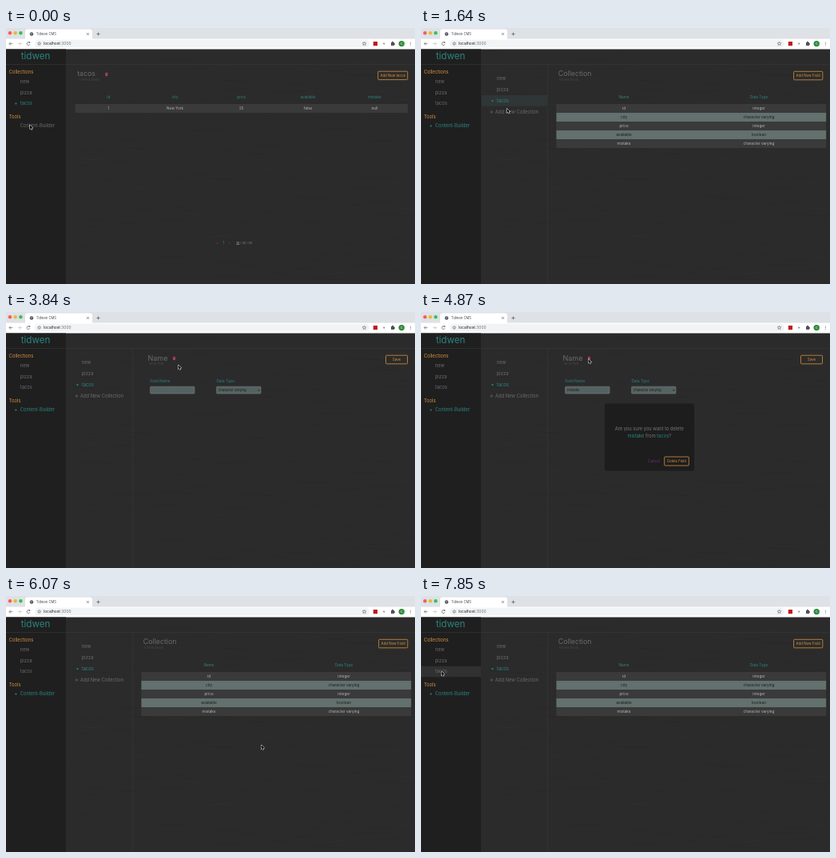
Animation, 512 px wide and 320 px high, one loop 8000 ms. Source, as an HTML page with a canvas:

```html
<!DOCTYPE html>
<html lang="en">
<head>
<meta charset="utf-8">
<title>Tidwen CMS</title>
<style>
html, body { margin: 0; width: 100%; height: 100%; overflow: hidden; background: #2b2b2b; }
canvas { display: block; width: 512px; height: 320px; }
</style>
</head>
<body>
<canvas id="stage"></canvas>
<script>
const W = 512, H = 320, LOOP = 8000, STEP = 148.15, LAST = 53;
const TEAL = '#2a8580', ORANGE = '#d5913f', GREY = '#6b6b6b', PALE = '#b5b5b5', DARK = '#1b1d1d';
const PURPLE = '#7d2480', PINK = '#b04358';

const canvas = document.getElementById('stage');
const ratio = window.devicePixelRatio || 1;
canvas.width = W * ratio;
canvas.height = H * ratio;
const ctx = canvas.getContext('2d');
ctx.scale(ratio, ratio);

// Cursor path: step, x, y
const path = [
  [1, 30, 121], [3, 31, 121], [8, 104, 92], [10, 105, 94], [11, 107.5, 100.5],
  [14, 190, 140], [16, 262, 153], [17, 268, 148], [18, 271, 145.5],
  [19, 278.5, 143], [22, 278.5, 143], [26, 215.7, 66], [28, 209.5, 58.5],
  [32, 209.5, 58.5], [37, 306, 181], [38, 320, 190], [39, 319.5, 186],
  [42, 319.5, 186], [45, 262, 158], [48, 133, 109.5], [50, 57, 104],
  [51, 45, 101], [52, 30, 97], [53, 25.5, 94]
];

function cursorAt(n) {
  const i = path.findIndex(p => p[0] >= n);
  if (i <= 0) return path[0].slice(1);
  const [a, ax, ay] = path[i - 1], [b, bx, by] = path[i];
  const k = (n - a) / (b - a);
  return [ax + (bx - ax) * k, ay + (by - ay) * k];
}

function box(x, y, w, h, fill) {
  ctx.fillStyle = fill;
  ctx.fillRect(x, y, w, h);
}

function round(x, y, w, h, r, fill, stroke, width = 0.8) {
  ctx.beginPath();
  ctx.roundRect(x, y, w, h, r);
  if (fill) { ctx.fillStyle = fill; ctx.fill(); }
  if (stroke) { ctx.strokeStyle = stroke; ctx.lineWidth = width; ctx.stroke(); }
}

function dot(x, y, r, fill) {
  ctx.fillStyle = fill;
  ctx.beginPath();
  ctx.arc(x, y, r, 0, Math.PI * 2);
  ctx.fill();
}

function line(points, color, width = 0.7) {
  ctx.strokeStyle = color;
  ctx.lineWidth = width;
  ctx.beginPath();
  points.forEach(([x, y], i) => i ? ctx.lineTo(x, y) : ctx.moveTo(x, y));
  ctx.stroke();
}

// y is the optical middle of the line; returns the text width
function text(str, x, y, size, color, align = 'left', family = 'Inter') {
  ctx.font = `${size}px ${family}, sans-serif`;
  ctx.textAlign = align;
  ctx.fillStyle = color;
  ctx.fillText(str, x, y + size * 0.34);
  return ctx.measureText(str).width;
}

function outlined(label, x, y, w, h, size = 4.4) {
  round(x, y, w, h, 1, null, ORANGE);
  text(label, x + w / 2, y + h / 2, size, ORANGE, 'center');
}

function trash(x, y) {
  box(x - 1.7, y - 1.9, 3.4, 0.8, PINK);
  box(x - 0.6, y - 2.3, 1.2, 0.5, PINK);
  box(x - 1.4, y - 0.9, 2.8, 3, PINK);
}

function browser() {
  box(0, 0, W, 14, '#dee1e6');
  round(24, 1.6, 84, 14, [3, 3, 0, 0], '#fff');
  box(0, 13.6, W, 12.9, '#fff');
  ['#fc5b57', '#e6b93a', '#35c24a'].forEach((c, i) => dot(5 + i * 6.7, 6.2, 2.2, c));
  dot(32, 7.5, 2.3, '#555b61');
  line([[30.5, 7], [32, 7.7], [33, 6.2]], '#c5c8cc', 0.6);
  text('Tidwen CMS', 37.8, 7.5, 4.2, '#45484c');
  line([[101.2, 6.2], [103.8, 8.8]], '#555');
  line([[103.8, 6.2], [101.2, 8.8]], '#555');
  line([[113.4, 7.5], [117.6, 7.5]], '#555');
  line([[115.5, 5.4], [115.5, 9.6]], '#555');

  line([[8.3, 19.6], [4, 19.6]], '#5f6368');
  line([[6, 17.6], [4, 19.6], [6, 21.6]], '#5f6368');
  line([[14.9, 19.6], [19.2, 19.6]], '#b8babd');
  line([[17.2, 17.6], [19.2, 19.6], [17.2, 21.6]], '#b8babd');
  ctx.beginPath();
  ctx.arc(28, 19.6, 2, 0.3, 5.5);
  ctx.strokeStyle = '#5f6368';
  ctx.stroke();
  box(28.6, 17.3, 1.7, 1.5, '#5f6368');

  round(36, 14.8, 419, 9.8, 4.9, '#f1f3f4');
  dot(41.6, 19.6, 2, '#696d72');
  dot(41.6, 19.6, 1.4, '#f1f3f4');
  box(41.3, 19.3, 0.6, 1.3, '#696d72');
  const w = text('localhost', 47, 19.6, 4.9, '#222');
  text(':3000', 47 + w, 19.6, 4.9, '#70757a');

  const star = Array.from({ length: 11 }, (_, i) => {
    const r = i % 2 ? 1.1 : 2.5, a = i * Math.PI / 5 - Math.PI / 2;
    return [448.5 + r * Math.cos(a), 19.6 + r * Math.sin(a)];
  });
  line(star, '#5f6368', 0.6);
  box(459.8, 17, 5.2, 5.2, '#c3151c');
  dot(473.2, 19.6, 1.1, '#8d9196');
  box(482, 18, 4, 4, '#4f5358');
  dot(484, 17.8, 1, '#4f5358');
  dot(486, 20, 1, '#4f5358');
  dot(495.2, 19.6, 3.7, '#2d8a3b');
  text('C', 495.2, 19.6, 4, '#fff', 'center');
  [-1.7, 0, 1.7].forEach(d => dot(506.3, 19.6 + d, 0.5, '#5f6368'));
}

// Faint grain on the page background
function grain() {
  let seed = 7;
  const rnd = () => (seed = seed * 16807 % 2147483647) / 2147483647;
  for (let i = 0; i < 260; i++) {
    const x = 75 + rnd() * 437, y = 28 + rnd() * 292, len = 8 + rnd() * 40;
    line([[x, y], [x + len / 2, y + rnd() - 0.5], [x + len, y + rnd() * 2 - 1]],
      i % 2 ? 'rgba(255,255,255,0.018)' : 'rgba(0,0,0,0.06)', 0.6);
  }
}

function item(label, x, y, active) {
  if (active) dot(x - 5.4, y, 1.1, TEAL);
  text(label, x, y, 5.8, active ? TEAL : GREY);
}

function sidebar(n, view) {
  box(0, 26.5, 75, H - 26.5, '#1f1f1f');
  line([[0, 45.5], [W, 45.5]], '#393939', 0.6);
  text('tidwen', 37, 35.5, 11.6, TEAL, 'center');
  if (n >= 2 && n < 5) box(0, 116, 75, 13, '#2c2c2c');
  if (n >= 52) box(0, 87.8, 75, 13.4, '#313131');
  text('Collections', 3.8, 55.3, 5.8, ORANGE);
  item('new', 17.8, 67, false);
  item('pizza', 17.8, 80.7, false);
  item('tacos', 17.8, 94.5, view === 'entries');
  text('Tools', 3.8, 111, 5.8, ORANGE);
  item('Content-Builder', 17.8, 122.5, view !== 'entries');
}

function builderList(n) {
  line([[158.5, 46], [158.5, H]], '#363636', 0.6);
  if (n >= 9 && n < 12) box(76, 84, 82, 13.6, '#303535');
  const chosen = n < 10 ? 'new' : 'tacos';
  ['new', 'pizza', 'tacos'].forEach((name, i) => item(name, 94.8, 63.5 + i * 13.8, name === chosen));
  line([[86.3, 105], [90.5, 105]], GREY, 0.6);
  line([[88.4, 102.9], [88.4, 107.1]], GREY, 0.6);
  text('Add New Collection', 93, 105, 5.8, GREY);
}

function entries() {
  text('tacos', 89.2, 57.5, 8.8, GREY);
  text('1 entries found', 91, 64.5, 3.7, '#494949');
  trash(125.8, 58);
  outlined('Add New tacos', 465.7, 54.2, 37, 10.4);
  box(86.7, 95, 416.3, 11, '#3a3a3a');
  const cells = { id: '1', city: 'New York', price: '25', available: 'false', mistake: 'null' };
  Object.entries(cells).forEach(([head, value], i) => {
    const x = 128.3 + i * 83.25;
    text(head, x, 86.3, 4.6, TEAL, 'center');
    text(value, x, 100.4, 4.6, PALE, 'center');
  });
  text('«', 264.5, 268, 4.6, PURPLE, 'center');
  text('1', 272, 268, 4.6, TEAL, 'center');
  text('»', 280, 268, 4.6, PURPLE, 'center');
  const w = text('10', 288, 268.3, 4.1, '#aaa');
  line([[288, 270.5], [288 + w, 270.5]], '#aaa', 0.5);
  text(' / 25 / 50', 288 + w, 268.3, 3.7, '#888');
}

function fields(n) {
  const varying = 'character varying';
  const rows = n < 10
    ? [['id', 'integer'], ['name', varying], ['size', 'integer']]
    : [['id', 'integer'], ['city', varying], ['price', 'integer'], ['available', 'boolean'], ['mistake', varying]];
  text('Collection', 171.8, 57.5, 8.8, GREY);
  text(`${rows.length} fields found`, 173, 64.5, 3.7, '#494949');
  outlined('Add New Field', 466.6, 54.3, 36.2, 10.5);
  text('Name', 254, 86.3, 4.7, TEAL, 'center');
  text('Data Type', 423, 86.3, 4.7, TEAL, 'center');
  rows.forEach(([name, type], i) => {
    const y = 95 + i * 11, color = i % 2 ? DARK : PALE;
    box(169.4, y, 337.8, 11, i % 2 ? '#62706e' : '#3a3a3a');
    text(name, 254, y + 5.3, 4.7, color, 'center');
    text(type, 423, y + 5.3, 4.7, color, 'center');
  });
}

function fieldForm(n) {
  text('Name', 177.5, 57.5, 9, GREY);
  text('tacos field', 179, 64.5, 3.7, '#494949');
  trash(210.5, 58);
  outlined('Save', 475.5, 54.2, 27, 10.6, 4.5);
  text('Field Name', 180.4, 86.8, 4.7, TEAL);
  text('Data Type', 263.4, 86.8, 4.7, TEAL);
  [180.6, 263.6].forEach(x => round(x, 93.2, 55.4, 8.8, 0.8, '#566261', '#74807f', 0.6));
  if (n >= 29) text('mistake', 183, 97.7, 4.2, DARK);
  text('character varying', 265.8, 97.7, 4.2, DARK);
  line([[315.2, 97], [316.6, 98.4], [318, 97]], '#111');
  if (n >= 29) modal(n);
}

function modal(n) {
  round(230, 114.4, 112, 84, 2, '#1d1d1d');
  const size = 5.75;
  text('Are you sure you want to delete', 285.8, 146.3, size, '#777', 'center');
  const parts = [['mistake', TEAL], [' from ', '#777'], ['tacos', TEAL], ['?', '#777']];
  ctx.font = `${size}px Inter, sans-serif`;
  let x = 285.8 - parts.reduce((sum, [s]) => sum + ctx.measureText(s).width, 0) / 2;
  parts.forEach(([s, color]) => { x += text(s, x, 155.2, size, color); });
  text('Cancel', 291.5, 186.5, 4.5, PURPLE, 'center');
  outlined('Delete Field', 304.7, 181, 30.6, 11, 4.25);
  if (n >= 40) {
    round(304.5, 180.8, 31, 11.4, 1.4, null, '#fff', 1);
    round(303.9, 180.2, 32.2, 12.6, 1.8, null, '#2f72d6', 0.7);
  }
}

function pointer([x, y]) {
  const shape = [[0, 0], [0, 5.4], [1.2, 4.3], [2, 6.2], [2.9, 5.8], [2.1, 4], [3.8, 3.9]];
  ctx.beginPath();
  shape.forEach(([dx, dy]) => ctx.lineTo(x + dx, y + dy));
  ctx.closePath();
  ctx.lineJoin = 'round';
  ctx.strokeStyle = '#fff';
  ctx.lineWidth = 1;
  ctx.stroke();
  ctx.fillStyle = '#000';
  ctx.fill();
}

function viewAt(n) {
  if (n < 4) return 'entries';
  return n >= 23 && n < 41 ? 'form' : 'fields';
}

function draw(t) {
  const n = Math.min(LAST, Math.floor((t + 13) / STEP));
  const view = viewAt(n);
  box(0, 0, W, H, '#2b2b2b');
  grain();
  browser();
  sidebar(n, view);
  if (view === 'entries') {
    entries();
  } else {
    builderList(n);
    view === 'form' ? fieldForm(n) : fields(n);
  }
  pointer(cursorAt(n));
}

const start = performance.now();
function tick() {
  draw((performance.now() - start) % LOOP);
  requestAnimationFrame(tick);
}
tick();
</script>
</body>
</html>
```
